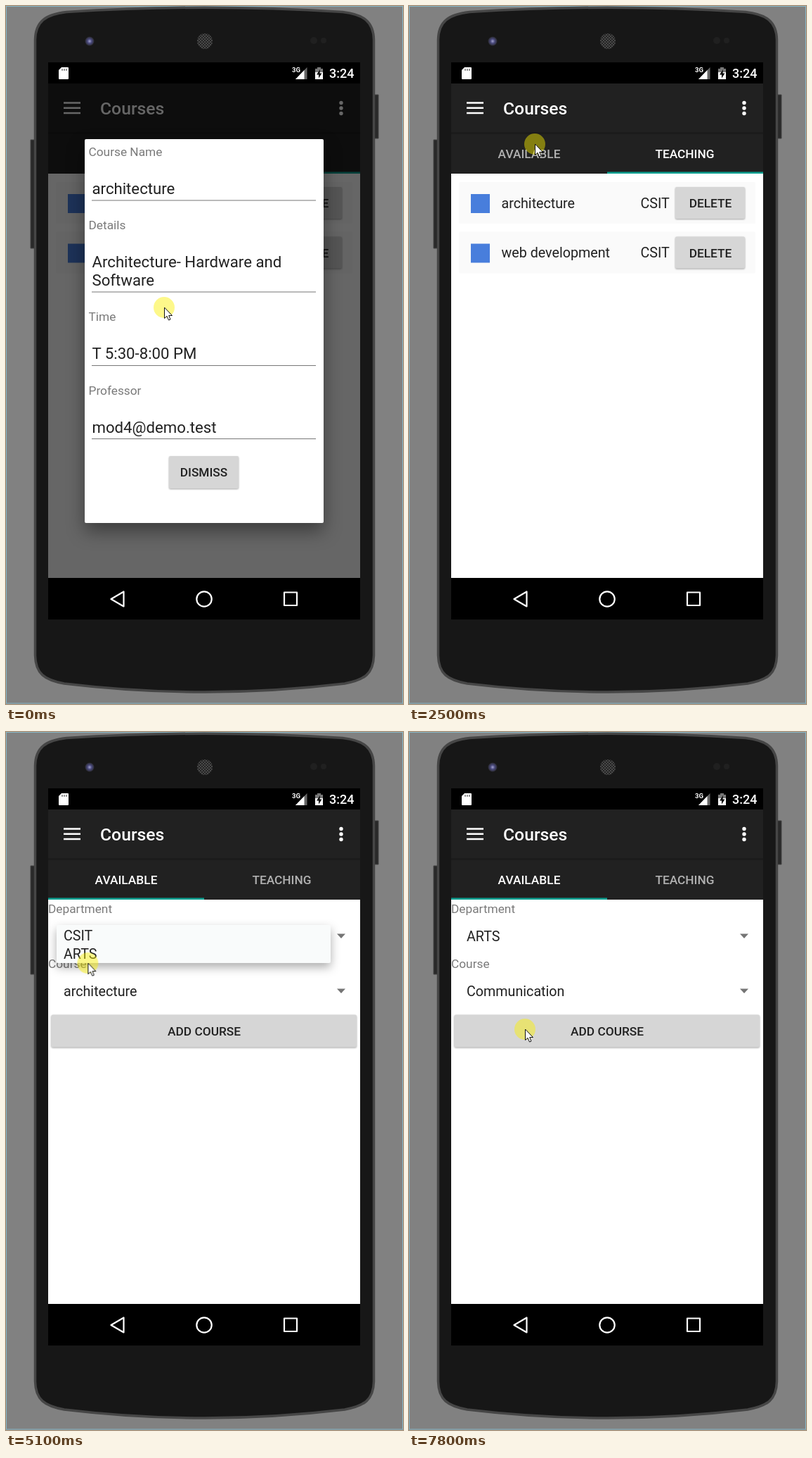
These frames come from a looping animation (565x991 px, 8000 ms). An HTML page:

```html
<!DOCTYPE html>
<html lang="en">
<head>
<meta charset="utf-8">
<title>Courses app</title>
<style>
  html, body { margin: 0; width: 100%; height: 100%; overflow: hidden; background: #818181; }
  svg { display: block; width: 100vw; height: 100vh; }
  text { font-family: Roboto, "Noto Sans", sans-serif; font-size: 19.7px; fill: #212121; }
  .label { font-size: 17.3px; fill: #7a7a7a; }
  .field { font-size: 22.2px; }
  .caps { font-size: 17.3px; font-weight: 500; text-anchor: middle; }
  .light { fill: #fff; }
  .title { font-size: 24.7px; font-weight: 500; }
  .clock { font-size: 18px; font-weight: 500; }
  .button { fill: #d6d6d6; filter: drop-shadow(0 1px 1px rgba(0,0,0,.35)); }
  .line { stroke: #777; stroke-width: 1.1; }

  .anim { animation: 8s linear infinite both; }
  .cut { animation-timing-function: step-end; }
  #dialog { animation-name: dialog; }
  #scrim { animation-name: scrim; }
  #pressed { animation-name: pressed; }
  #pages { animation-name: pages; }
  #indicator { animation-name: indicator; }
  #available { animation-name: brighten; }
  #teaching { animation-name: dim; }
  #popup { animation-name: popup; }
  .before { animation-name: vanish; }
  .after { animation-name: appear; }
  #pointer { animation-name: pointer; }

  @keyframes dialog { 0%, 17.9% { opacity: 1 } 19.75%, 100% { opacity: 0 } }
  @keyframes scrim { 0%, 17.9% { opacity: .6 } 20.75%, 100% { opacity: 0 } }
  @keyframes pressed { 0%, 15.8% { opacity: 0 } 17.4%, 100% { opacity: 1 } }
  @keyframes pages {
    0%, 32% { transform: translateX(0); animation-timing-function: ease-out }
    36.5%, 100% { transform: translateX(444px) }
  }
  @keyframes indicator {
    0%, 32% { transform: translateX(222px); animation-timing-function: ease-out }
    36.5%, 100% { transform: translateX(0) }
  }
  @keyframes brighten { 0%, 32% { opacity: .65 } 35%, 100% { opacity: 1 } }
  @keyframes dim { 0%, 32% { opacity: 1 } 35%, 100% { opacity: .65 } }
  @keyframes popup {
    0%, 56.9% { opacity: 0 }
    59.4%, 76.5% { opacity: 1 }
    78.75%, 100% { opacity: 0 }
  }
  @keyframes vanish { 0% { opacity: 1 } 77.5%, 100% { opacity: 0 } }
  @keyframes appear { 0% { opacity: 0 } 77.5%, 100% { opacity: 1 } }
  @keyframes pointer {
    0% { transform: translate(225px, 428px); animation-timing-function: ease-in-out }
    12.5%, 17.5% { transform: translate(281px, 665px) }
    20% { transform: translate(141px, 446px); animation-timing-function: ease-in-out }
    27.5%, 30% { transform: translate(179px, 208px) }
    31.25%, 33% { transform: translate(179px, 196px); animation-timing-function: ease-in-out }
    41.25% { transform: translate(127px, 386px); animation-timing-function: ease-in-out }
    47.5%, 50% { transform: translate(134px, 290px) }
    52.5% { transform: translate(141px, 292px) }
    56.25%, 58.75% { transform: translate(141px, 295px); animation-timing-function: ease-in-out }
    66.25% { transform: translate(109px, 338px); animation-timing-function: ease-in-out }
    73.75%, 77% { transform: translate(114px, 320px); animation-timing-function: ease-in-out }
    82% { transform: translate(118px, 548px); animation-timing-function: ease-in-out }
    86.25% { transform: translate(110px, 361px) }
    87.5%, 88.75% { transform: translate(110px, 357px); animation-timing-function: ease-in-out }
    97.5%, 100% { transform: translate(165px, 422px) }
  }
</style>
</head>
<body>
<svg viewBox="0 0 565 991">
  <defs>
    <clipPath id="content"><rect x="60" y="238" width="444" height="574"/></clipPath>
    <pattern id="mesh" width="4" height="4" patternUnits="userSpaceOnUse">
      <circle cx="1" cy="1" r="1" fill="#555"/><circle cx="3" cy="3" r="1" fill="#555"/>
    </pattern>
    <radialGradient id="lens">
      <stop offset="0" stop-color="#a5a5cf"/><stop offset=".45" stop-color="#4c4c80"/>
      <stop offset="1" stop-color="#29292f"/>
    </radialGradient>
    <g id="row">
      <rect x="71" y="250" width="422" height="59" rx="2" fill="#fafafa"/>
      <rect x="88" y="267" width="27" height="27" fill="#487edc"/>
      <text x="329.5" y="286.5">CSIT</text>
      <rect class="button" x="379" y="257" width="99" height="45" rx="2"/>
      <text class="caps" x="429" y="286">DELETE</text>
    </g>
    <path id="arrow" d="M471 286.5h12l-6 6.5z" fill="#757575"/>
  </defs>

  <rect width="565" height="991" fill="#818181"/>
  <rect x=".5" y=".5" width="564" height="989.5" fill="none" stroke="#85b5c5"/>

  <!-- phone -->
  <path d="M35 190h6v154h-6zM524 126h6v62h-6z" fill="#292929" stroke="#444"/>
  <path d="M41.5 48C42 22 56 12 86 8.500Q282-4 479 8.500C509 12 523 22 523.500 48V922C523 948 510 957 482 962Q282 986 83 962C55 957 42 948 41.500 922Z"
        fill="#171717" stroke="#464646" stroke-width="3.500"/>
  <circle cx="119" cy="50" r="6.500" fill="url(#lens)"/>
  <circle cx="283" cy="50" r="11" fill="#242424"/>
  <circle cx="283" cy="50" r="11" fill="url(#mesh)"/>
  <circle cx="438" cy="49" r="5" fill="#202020"/><circle cx="452" cy="49" r="4" fill="#202020"/>
  <rect x="60" y="80" width="444" height="791"/>

  <!-- status bar -->
  <path d="M79 87h9q1 0 1 1v15q0 1-1 1H76q-1 0-1-1V91z" fill="#fff"/>
  <path d="M80 89v3m3-3v3m3-3v3" stroke="#333"/>
  <path d="M428.500 87v17H412z" fill="#666"/><path d="M424.500 91v13H412z" fill="#fff"/>
  <text class="light" x="407" y="94" style="font-size:9.500px;font-weight:700">3G</text>
  <path d="M443 87h5v2h3v15h-11V89h3z" fill="#777"/><path d="M440 94h11v10h-11z" fill="#fff"/>
  <path d="M447 90l-5 7.500h3v5l4.500-7h-3z"/>
  <text class="clock light" x="460" y="102">3:24</text>

  <!-- toolbar and tabs -->
  <rect x="60" y="110" width="444" height="128" fill="#212121"/>
  <rect x="60" y="179" width="444" height="3" fill="#1b1b1b"/>
  <path d="M82 137.500h24M82 144.700h24M82 152h24" stroke="#fff" stroke-width="2.500"/>
  <text class="title light" x="134" y="154">Courses</text>
  <g fill="#fff"><circle cx="477" cy="137.500" r="2.700"/><circle cx="477" cy="145" r="2.700"/><circle cx="477" cy="152.500" r="2.700"/></g>
  <text id="available" class="caps light anim" x="171" y="215.500">AVAILABLE</text>
  <text id="teaching" class="caps light anim" x="392.500" y="215.500">TEACHING</text>
  <rect id="indicator" class="anim" x="60" y="235.500" width="222" height="2.500" fill="#08a091"/>

  <!-- tab pages, side by side -->
  <rect x="60" y="238" width="444" height="574" fill="#fff"/>
  <g clip-path="url(#content)">
    <g id="pages" class="anim">
      <use href="#row"/><use href="#row" y="70.500"/>
      <text x="131.500" y="286.500">architecture</text>
      <text x="131.500" y="357">web development</text>
      <g transform="translate(-444)">
        <text class="label" x="60" y="257">Department</text>
        <text class="before anim cut" x="82" y="297">CSIT</text>
        <text class="after anim cut" x="82" y="297">ARTS</text>
        <use href="#arrow"/>
        <text class="label" x="60" y="335">Course</text>
        <text class="before anim cut" x="82" y="374.500">architecture</text>
        <text class="after anim cut" x="82" y="374.500">Communication</text>
        <use href="#arrow" y="78"/>
        <rect class="button" x="64.500" y="401.500" width="434.500" height="46" rx="2"/>
        <text class="caps" x="282" y="430.500">ADD COURSE</text>
      </g>
    </g>
    <g id="popup" class="anim">
      <rect x="72" y="274" width="390" height="54" rx="2" fill="#f9fbfb" style="filter:drop-shadow(0 6px 7px rgba(0,0,0,.32))"/>
      <text x="82" y="295.500">CSIT</text><text x="82" y="322">ARTS</text>
    </g>
  </g>

  <rect id="scrim" class="anim" x="60" y="110" width="444" height="702"/>

  <g id="dialog" class="anim">
    <rect x="112" y="189" width="340" height="545" rx="2" fill="#fff" style="filter:drop-shadow(0 12px 13px rgba(0,0,0,.4))"/>
    <text class="label" x="117.500" y="213">Course Name</text>
    <text class="field" x="122.500" y="266.500">architecture</text>
    <text class="label" x="117.500" y="317">Details</text>
    <text class="field" x="122.500" y="371">Architecture- Hardware and</text>
    <text class="field" x="122.500" y="397">Software</text>
    <text class="label" x="117.500" y="447">Time</text>
    <text class="field" x="122.500" y="501">T 5:30-8:00 PM</text>
    <text class="label" x="117.500" y="551.500">Professor</text>
    <text class="field" x="122.500" y="605.500">mod4@demo.test</text>
    <path class="line" d="M122 276h319M122 406h319M122 510.500h319M122 614.500h319"/>
    <rect class="button" x="232" y="639" width="99" height="46" rx="2"/>
    <rect id="pressed" class="anim" x="232" y="639" width="99" height="46" rx="2" fill="#d0d3d3" style="filter:drop-shadow(0 4px 4px rgba(0,0,0,.32))"/>
    <text class="caps" x="281.500" y="667.500">DISMISS</text>
  </g>

  <!-- navigation bar -->
  <g fill="none" stroke="#fff" stroke-width="2.200" stroke-linejoin="round">
    <path d="M149.500 842L167.500 831.500V852.500Z"/>
    <circle cx="282" cy="842" r="10.700"/>
    <path d="M396 832.500h18v18.500h-18z"/>
  </g>

  <g id="pointer" class="anim">
    <circle r="15" fill="#faf000" opacity=".46"/>
    <path d="M.5 0V15.500L4 12.300 6.500 18 9 17 6.700 11.500H11.500Z" fill="#fff" stroke="#111" stroke-linejoin="round"/>
  </g>
</svg>
</body>
</html>
```
